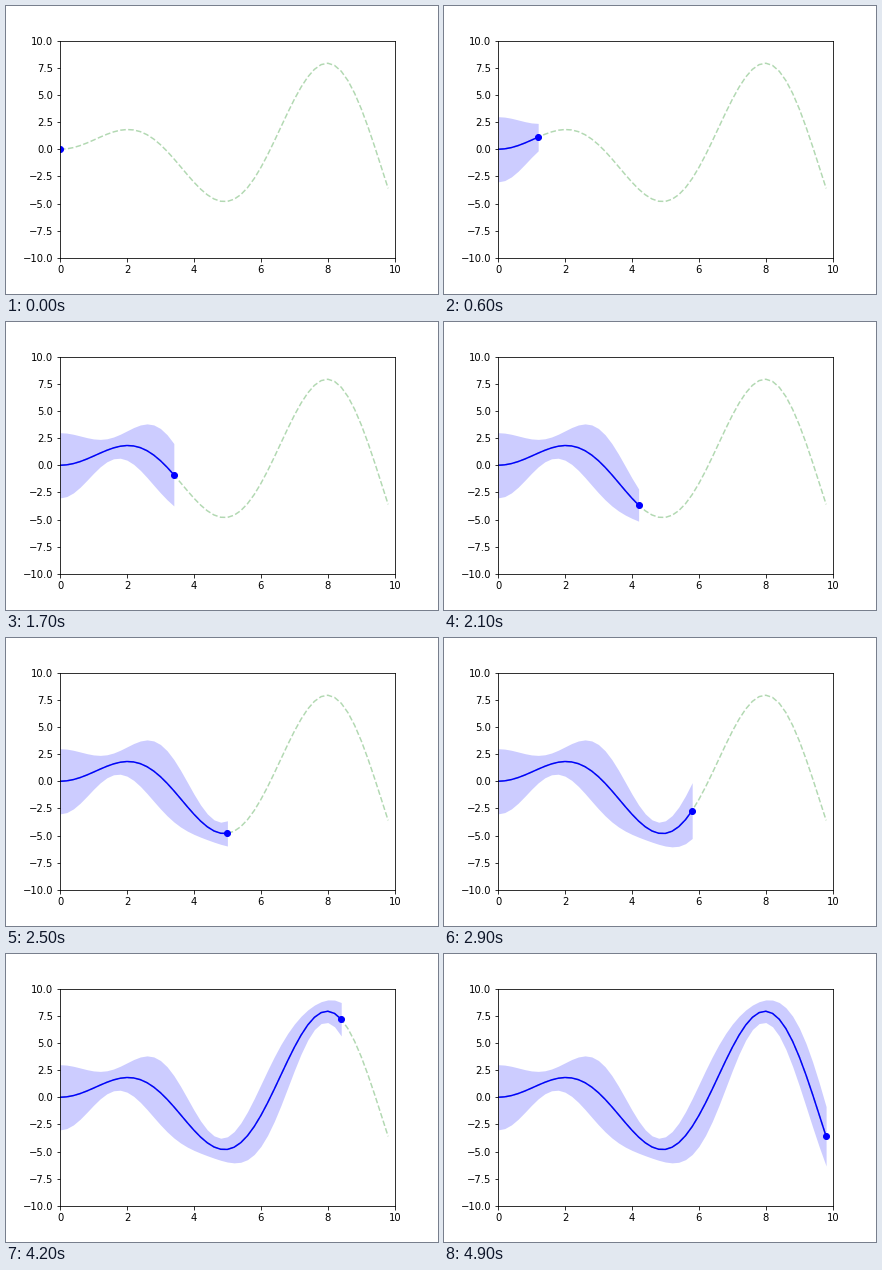
Write a matplotlib script that moves like this. It is 432 by 288 pixels and loops after 5 s.

```python
import matplotlib.pyplot as plt
import numpy as np
from matplotlib.animation import FuncAnimation

FRAMES = 50
INTERVAL = 100

x = np.arange(FRAMES) * 0.2
y = x * np.sin(x)
spread = 2 + np.cos(2 * x)

plt.rcParams["font.family"] = "DejaVu Sans"
fig = plt.figure(figsize=(6, 4), dpi=72)
ax = fig.add_axes([0.125, 0.125, 0.775, 0.755])
ax.set(xlim=(0, 10), ylim=(-10, 10))

ax.plot(x, y, "g--", alpha=0.3)
line, = ax.plot([], [], "b-")
dot, = ax.plot([], [], "bo")
band = ax.fill_between([], [], [], color="b", alpha=0.2, linewidth=0)


def band_outline(n):
    """Closed outline of the band over the first n samples."""
    upper = np.column_stack([x, y + spread])[:n]
    lower = np.column_stack([x, y - spread])[:n]
    return np.vstack([upper, lower[::-1]])


def update(i):
    n = i + 1
    line.set_data(x[:n], y[:n])
    dot.set_data([x[i]], [y[i]])
    band.set_verts([band_outline(n)] if n > 1 else [])
    return line, dot, band


anim = FuncAnimation(fig, update, frames=FRAMES, init_func=lambda: update(0),
                     interval=INTERVAL, repeat=True, repeat_delay=0)
plt.show()
```
